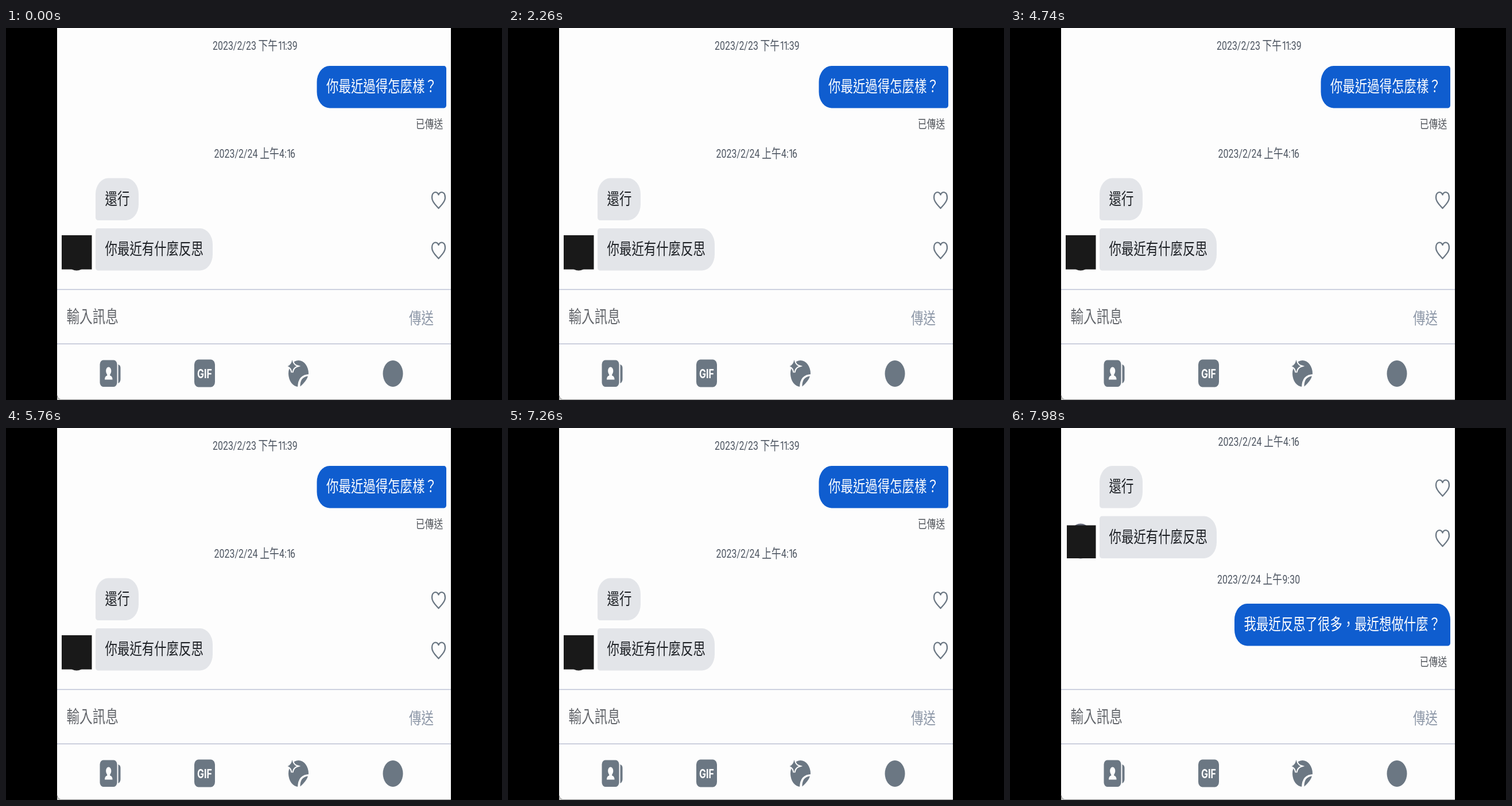
Animation of 864 by 648 pixels, one loop 8000 ms. Source, as an HTML page:

```html
<!DOCTYPE html>
<html lang="zh-Hant">
<head>
<meta charset="utf-8">
<style>
html, body { margin: 0; width: 100%; height: 100%; overflow: hidden; background: #000; }
svg { display: block; width: 100vw; height: 100vh; }
.cjk { font-family: "Noto Sans CJK TC", "Noto Sans CJK", sans-serif; }
.num { font-family: Roboto, sans-serif; }
.ui { font-family: Inter, sans-serif; }
</style>
</head>
<body>
<svg id="stage" viewBox="0 0 864 648" preserveAspectRatio="none"></svg>
<script>
const LOOP = 8000, CUT = 7400;
const SQUEEZE = 0.762; // the whole screen is shown narrower than it is tall
const INK = '#1d2025', ICON = '#6b7783', PAPER = '#fdfdfd';
const BLUE = '#0f5dcf', GREY = '#e3e5e9', STAMP = '#4d5561';

const text = (x, y, size, fill, str, cls = 'cjk', extra = '') =>
  `<text class="${cls}" transform="translate(${x} ${y}) scale(${SQUEEZE} 1)" font-size="${size}" fill="${fill}" ${extra}>${str}</text>`;

// Digits with a narrow "1"
const digits = (x, y, str) => {
  const dx = [...str].map((c, i) => str[i - 1] === '1' ? '-.17em' : '0').join(' ');
  return text(x, y, 20.9, STAMP, str, 'num', `dx="${dx}"`);
};

const stamp = (x, y, date, half, time) =>
  digits(x, y, date) + text(x + 79.6, y, 22, STAMP, half) + digits(x + 113.4, y, time);

// Corners: top left, top right, bottom right, bottom left (true = round)
function bubble(x, y, w, fill, color, corners, str) {
  const h = 73.5;
  const [a, b, c, d] = corners.map(big => big ? [22, 28] : [4, 5]);
  const path = `M${x + a[0]} ${y}H${x + w - b[0]}a${b} 0 0 1 ${b}V${y + h - c[1]}`
    + `a${c} 0 0 1 ${-c[0]} ${c[1]}H${x + d[0]}a${d} 0 0 1 ${-d[0]} ${-d[1]}`
    + `V${y + a[1]}a${a} 0 0 1 ${a[0]} ${-a[1]}Z`;
  return `<path d="${path}" fill="${fill}"/>` + text(x + 16.6, y + 46, 28.1, color, str);
}

const heart = y => `<path transform="translate(753.5 ${y})" fill="none" stroke="${ICON}" stroke-width="2.3" stroke-linejoin="round"
  d="M0 14C-3 10 -11.5 4 -11.5 -4.5C-11.5 -15.5 -2.5 -16.5 0 -9.5C2.5 -16.5 11.5 -15.5 11.5 -4.5C11.5 4 3 10 0 14Z"/>`;

const avatar = (y, rim, x, top, w, h) =>
  `<ellipse cx="123" cy="${y}" rx="22" ry="30.5" fill="${rim}"/>
   <rect x="${x}" y="${top}" width="${w}" height="${h}" fill="#191919"/>`;

const reply = y =>
  bubble(156, y, 75, GREY, INK, [1, 1, 1, 0], '還行') + heart(y + 38.5) +
  bubble(156, y + 87.5, 204, GREY, INK, [0, 1, 1, 0], '你最近有什麼反思') + heart(y + 126);

const sent = y => text(713.7, y, 20.8, '#53575d', '已傳送');

const before =
  stamp(360, 38, '2023/2/23', '下午', '11:39') +
  bubble(541.5, 66, 225.5, BLUE, '#fff', [1, 0, 0, 1], '你最近過得怎麼樣？') +
  sent(174.5) +
  stamp(362.6, 226, '2023/2/24', '上午', '4:16') +
  avatar(392, '#222', 97, 361, 52.5, 59.5) + reply(261.5);

const after =
  stamp(362.6, 31, '2023/2/24', '上午', '4:16') +
  avatar(197, '#686d7c', 99, 169.5, 50.5, 57.5) + reply(66) +
  stamp(361, 271, '2023/2/24', '上午', '9:30') +
  bubble(391, 306, 376, BLUE, '#fff', [1, 1, 0, 1], '我最近反思了很多，最近想做什麼？') +
  sent(414.5);

const contact = `<g fill="${ICON}">
  <rect x="163.5" y="578.5" width="30" height="46.5" rx="6" ry="7.5"/>
  <path d="M195.5 586Q199.5 587.5 199.5 592V612Q199.5 616.5 195.5 619Z"/></g>
  <g fill="${PAPER}"><ellipse cx="178.7" cy="597.5" rx="4.6" ry="7"/>
  <path d="M176.2 602H181.2V605.5Q185.5 606.5 185.5 612.5H172Q172 606.5 176.2 605.5Z"/></g>`;

const gif = `<rect x="328" y="577.5" width="36" height="48" rx="7" ry="9" fill="${ICON}"/>` +
  text(346, 610, 21, '#fff', 'GIF', 'ui', 'font-weight="700" text-anchor="middle"');

const sticker = `<g fill="${ICON}">
  <ellipse cx="509.5" cy="602" rx="17.5" ry="23"/>
  <path d="M508 627Q508 603 529 603V627Z" fill="${PAPER}"/>
  <path d="M512.5 624.5Q512 608 526 606.5Q523.5 615 512.5 624.5Z"/>
  <path d="M498.5 578Q500 587 506.5 589Q500 591 498.5 600Q497 591 490.5 589Q497 587 498.5 578Z"
    stroke="${PAPER}" stroke-width="4" paint-order="stroke"/></g>`;

const footer = `<path d="M89 455.6H775M89 550.2H775" stroke="#bcc1d4" stroke-width="1.5"/>` +
  text(105.5, 512.5, 29.7, '#64676c', '輸入訊息') +
  text(702, 515.5, 28.2, '#8e98a8', '傳送', 'cjk', 'font-weight="500"') +
  contact + gif + sticker +
  `<ellipse cx="674" cy="602" rx="17.5" ry="23" fill="${ICON}"/>
   <path d="M89 640Q91 648 97 648H89Z" fill="#c9cac8"/>
   <path d="M89 640Q91 647.5 97 647.5H775" fill="none" stroke="#8b8b8b"/>`;

const stage = document.getElementById('stage');
stage.innerHTML = `<rect width="864" height="648"/>
  <rect x="89" width="686" height="648" fill="${PAPER}"/>
  <g id="before">${before}</g><g id="after">${after}</g>${footer}`;

const scenes = ['before', 'after'].map(id => document.getElementById(id));

function draw(ms) {
  const current = ms % LOOP < CUT ? 0 : 1;
  scenes.forEach((g, i) => g.setAttribute('visibility', i === current ? 'visible' : 'hidden'));
}

const start = performance.now();
function tick(now) {
  draw(Math.max(0, now - start));
  requestAnimationFrame(tick);
}
draw(0);
requestAnimationFrame(tick);
</script>
</body>
</html>
```
